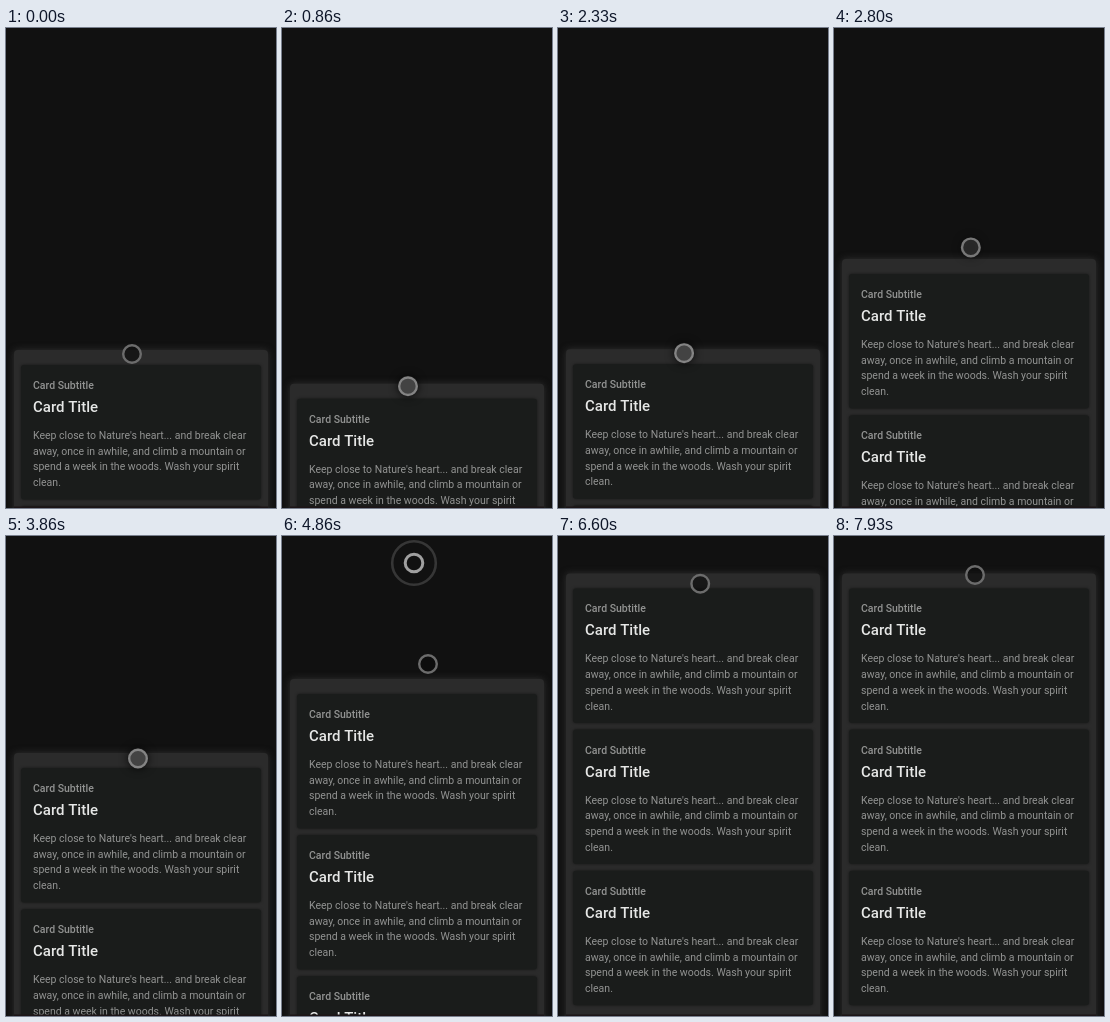
An HTML page with a canvas that plays this animation: 270x480 px, repeating every 8000 ms.

```html
<!DOCTYPE html>
<html lang="en">
<head>
<meta charset="utf-8">
<title>Bottom sheet drag</title>
<style>
  html, body { margin: 0; width: 100%; height: 100%; overflow: hidden; background: #111; }
  canvas { display: block; width: 270px; height: 480px; }
</style>
</head>
<body>
<canvas id="stage" width="270" height="480"></canvas>
<script>
const ctx = document.getElementById('stage').getContext('2d');
const LOOP = 8000;
const FONT = 'Roboto, sans-serif';
const BODY = [
  "Keep close to Nature's heart... and break clear",
  'away, once in awhile, and climb a mountain or',
  'spend a week in the woods. Wash your spirit',
  'clean.'
];

// Resting heights of the sheet
const LOW = 322, MIDDLE = 217, HIGH = 37.4;

// Smooth progress from 0 to 1 between two times
function glide(t, from, to) {
  const k = Math.min(1, Math.max(0, (t - from) / (to - from)));
  return k * k * (3 - 2 * k);
}

function poseAt(t) {
  const dip = glide(t, 500, 1330) - glide(t, 1430, 2130);
  const toMiddle = glide(t, 2300, 2950);
  const regrab = glide(t, 3300, 3460);
  const toHigh = glide(t, 3870, 4400);
  const tug = glide(t, 4430, 4830);
  const snap = glide(t, 4860, 5120);

  // The idle pointer wanders after the last release
  const lift = glide(t, 5290, 5530);
  const creep = (glide(t, 5690, 5860) + glide(t, 5960, 6060)) / 2;
  const left = glide(t, 6560, 6730);
  const further = glide(t, 6890, 7000);
  const hop = glide(t, 7160, 7460);
  const back = glide(t, 7690, 7930);

  return {
    sheet: LOW + 83.5 * dip + (MIDDLE - LOW) * toMiddle + (HIGH - MIDDLE) * toHigh
      + 105.5 * (tug - snap),
    x: 126 + 12.5 * toMiddle - 6.5 * regrab + 14 * tug - lift
      - 19 * left - 11 * further - 13.5 * hop + 39.5 * back,
    y: 326 + 80 * dip - 123 * toMiddle + 19.5 * regrab - 195.5 * toHigh + 101 * tug
      - 67 * lift - 14 * creep + 5 * (left - further) - 16 * Math.sin(Math.PI * hop) - 8 * back,
    press: glide(t, 130, 260) - glide(t, 2730, 2870) + glide(t, 3560, 3690) - glide(t, 4760, 4850),
    ripple: glide(t, 4330, 4400) - glide(t, 4890, 4990)
  };
}

function box(x, y, w, h, radius, fill, shadow, blur) {
  ctx.save();
  ctx.shadowColor = shadow;
  ctx.shadowBlur = blur;
  ctx.fillStyle = fill;
  ctx.beginPath();
  ctx.roundRect(x, y, w, h, radius);
  ctx.fill();
  ctx.restore();
}

function text(string, y, font, fill) {
  ctx.font = `${font} ${FONT}`;
  ctx.fillStyle = fill;
  ctx.fillText(string, 27, y);
}

function circle(x, y, radius) {
  ctx.beginPath();
  ctx.arc(x, y, radius, 0, Math.PI * 2);
}

function disc(x, y, radius, color) {
  ctx.fillStyle = color;
  circle(x, y, radius);
  ctx.fill();
}

function ring(x, y, radius, width, color) {
  ctx.lineWidth = width;
  ctx.strokeStyle = color;
  circle(x, y, radius);
  ctx.stroke();
}

function drawCard(y) {
  box(15, y, 240, 134.5, 3, '#1a1c1b', 'rgba(0,0,0,.5)', 3);
  text('Card Subtitle', y + 24, '500 10.5px', '#929392');
  text('Card Title', y + 47, '500 15px', '#e6e7e6');
  BODY.forEach((line, i) => text(line, y + 74 + i * 15.7, '400 10.5px', '#929392'));
}

function drawSheet(y) {
  box(8, y, 254, 500, 4, '#2b2b2b', '#303030', 7);
  for (let i = 0; i < 3; i++) drawCard(y + 15 + i * 141.2);
  if (y > 380) {
    ctx.fillStyle = '#555';
    ctx.fillRect(257, y + 10, 1.5, 11);
  }
  ctx.fillStyle = '#1c1517';
  ctx.fillRect(8, 478.5, 254, 1.5);
}

function drawPointer({ x, y, press }) {
  ctx.save();
  ctx.globalAlpha = press;
  ctx.shadowColor = 'rgba(0,0,0,.7)';
  ctx.shadowBlur = 8;
  disc(x, y, 10.5, '#1c1c1c');
  ctx.restore();
  disc(x, y, 8, 'rgba(12,12,12,.65)');
  disc(x, y, 8, `rgba(80,80,80,${press * 0.8})`);
  const shade = 108 + 24 * press;
  ring(x, y, 8.8, 2.4, `rgb(${shade},${shade},${shade})`);
}

function drawRipple(alpha) {
  ctx.save();
  ctx.globalAlpha = alpha;
  ring(132, 27, 21.8, 2.6, '#363636');
  ring(132, 27, 8.8, 3, '#a0a0a0');
  ctx.restore();
}

function draw(t) {
  const pose = poseAt(t);
  ctx.fillStyle = '#111';
  ctx.fillRect(0, 0, 270, 480);
  drawSheet(pose.sheet);
  drawRipple(pose.ripple);
  drawPointer(pose);
}

const start = performance.now();
function tick() {
  draw((performance.now() - start) % LOOP);
  requestAnimationFrame(tick);
}
tick();
</script>
</body>
</html>
```
